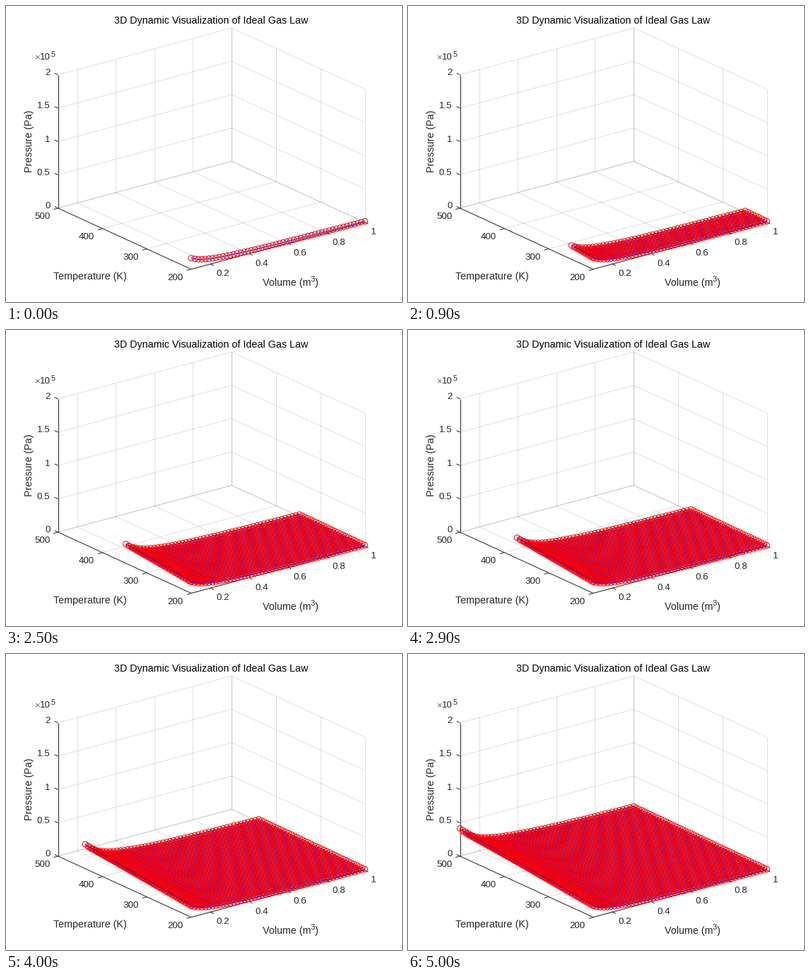
Recreate the animation shown at these times as a matplotlib script. Size 560 by 420 pixels, loop 5.2 s.

```python
import numpy as np
import matplotlib.pyplot as plt
from matplotlib.animation import FuncAnimation
from matplotlib.collections import LineCollection

W, H, DPI = 560, 420, 100
PX = 72 / DPI
plt.rcParams["font.family"] = "Liberation Sans"

INK = (0.15, 0.15, 0.15)
GRID = (0.15, 0.15, 0.15, 0.15)
RED, BLUE = (1, 0, 0), (0, 0, 1)

# Orthographic view, stretched to fill the plot box
AZ, EL = np.radians(37.5), np.radians(30)
SX = 434 / (np.cos(AZ) + np.sin(AZ))
SY = 342.3 / (np.sin(EL) * (np.cos(AZ) + np.sin(AZ)) + np.cos(EL))
LEFT, BOTTOM = 73.5, 373.5


def project(v, t, p):
    """Unit-cube position to stage pixels."""
    x = LEFT + SX * (np.cos(AZ) * v + np.sin(AZ) * (1 - t))
    y = BOTTOM - SY * (np.sin(EL) * (np.sin(AZ) * v + np.cos(AZ) * t)
                       + np.cos(EL) * p)
    return np.array([x, y])


def nearness(v, t, p):
    return np.cos(EL) * (-np.sin(AZ) * v - np.cos(AZ) * t) + np.sin(EL) * p


fig = plt.figure(figsize=(W / DPI, H / DPI), dpi=DPI, facecolor="white")
ax = fig.add_axes([0, 0, 1, 1])
ax.set_xlim(0, W)
ax.set_ylim(H, 0)
ax.set_axis_off()


def line(a, b, color, width=1.0):
    (x0, y0), (x1, y1) = project(*a), project(*b)
    ax.plot([x0, x1], [y0, y1], color=color, lw=width * PX,
            solid_capstyle="butt", zorder=1)


def label(x, y, text, size=13.33, ha="left", color=INK, **kw):
    ax.text(x, y, text, fontsize=size * PX, ha=ha, va="baseline",
            color=color, zorder=2, **kw)


v_ticks = [0.2, 0.4, 0.6, 0.8, 1]
t_ticks = [200, 300, 400, 500]
p_ticks = [0, 0.5, 1, 1.5, 2]
v_pos = [(v - 0.1) / 0.9 for v in v_ticks]
t_pos = [(t - 200) / 300 for t in t_ticks]
p_pos = [p / 2 for p in p_ticks]

# Grid on the floor and the two back walls
for v in v_pos:
    line((v, 0, 0), (v, 1, 0), GRID)
    line((v, 1, 0), (v, 1, 1), GRID)
for t in t_pos:
    line((0, t, 0), (1, t, 0), GRID)
    line((1, t, 0), (1, t, 1), GRID)
for p in p_pos:
    line((0, 1, p), (1, 1, p), GRID)
    line((1, 0, p), (1, 1, p), GRID)

# Axes, ticks and tick labels
line((0, 0, 0), (1, 0, 0), INK)
line((0, 0, 0), (0, 1, 0), INK)
line((0, 1, 0), (0, 1, 1), INK)
TICK = 0.026
for v, value in zip(v_pos, v_ticks):
    line((v, 0, 0), (v, -TICK, 0), INK)
    x, y = project(v, 0, 0)
    label(x + 8.5, y + 17.2, f"{value:g}")
for t, value in zip(t_pos, t_ticks):
    line((0, t, 0), (-TICK, t, 0), INK)
    x, y = project(0, t, 0)
    label(x - 11, y + 15.3, f"{value:g}", ha="right")
for p, value in zip(p_pos, p_ticks):
    line((0, 1, p), (0, 1 + TICK, p), INK)
    x, y = project(0, 1, p)
    label(x - 11, y + 0.4, f"{value:g}", ha="right")

label(40.3, 76, "×", color=(0.4, 0.4, 0.4))
label(48, 76, "10")
label(63.2, 72.3, "5", size=10.7)

# Title and axis names
NAME = 14.2
label(289.7, 25, "3D Dynamic Visualization of Ideal Gas Law", NAME,
      ha="center", color="black")
label(119, 388, "Temperature (K)", NAME, ha="center")
label(363, 397.5, "Volume (m", NAME)
label(430.8, 391, "3", 11)
label(436.7, 397.5, ")", NAME)
label(36.5, 192, "Pressure (Pa)", NAME, rotation=90,
      rotation_mode="anchor", ha="center")

# Isotherms of P = nRT / V: a blue curve with red rings on each
N, R_GAS, RING = 50, 8.314, 4.0
vol = np.linspace(0.1, 1, N)
temp = np.linspace(200, 500, N)
angle = np.linspace(0, 2 * np.pi, 25)
ring = RING * np.column_stack([np.cos(angle), np.sin(angle)])

parts = []  # (nearness, row, path, colour)
for row, T in enumerate(temp):
    v = (vol - 0.1) / 0.9
    t = np.full(N, (T - 200) / 300)
    p = R_GAS * T / vol / 2e5
    xy = project(v, t, p).T
    near = nearness(v, t, p)
    for j in range(N):
        parts.append((near[j], row, xy[j] + ring, RED))
        if j:
            mid = (near[j - 1] + near[j]) / 2
            parts.append((mid, row, xy[j - 1:j + 1], BLUE))
parts.sort(key=lambda part: part[0])

surface = LineCollection([], linewidths=1.0 * PX, zorder=3)
ax.add_collection(surface, autolim=False)


def draw(i):
    # The fourth and the last isotherm each stay for two ticks
    last = i if i < 4 else min(i - 1, N - 1)
    shown = [part for part in parts if part[1] <= last]
    surface.set_segments([part[2] for part in shown])
    surface.set_color([part[3] for part in shown])
    return [surface]


anim = FuncAnimation(fig, draw, frames=52, interval=100, repeat=True,
                     repeat_delay=0, init_func=lambda: draw(0))
plt.show()
```
